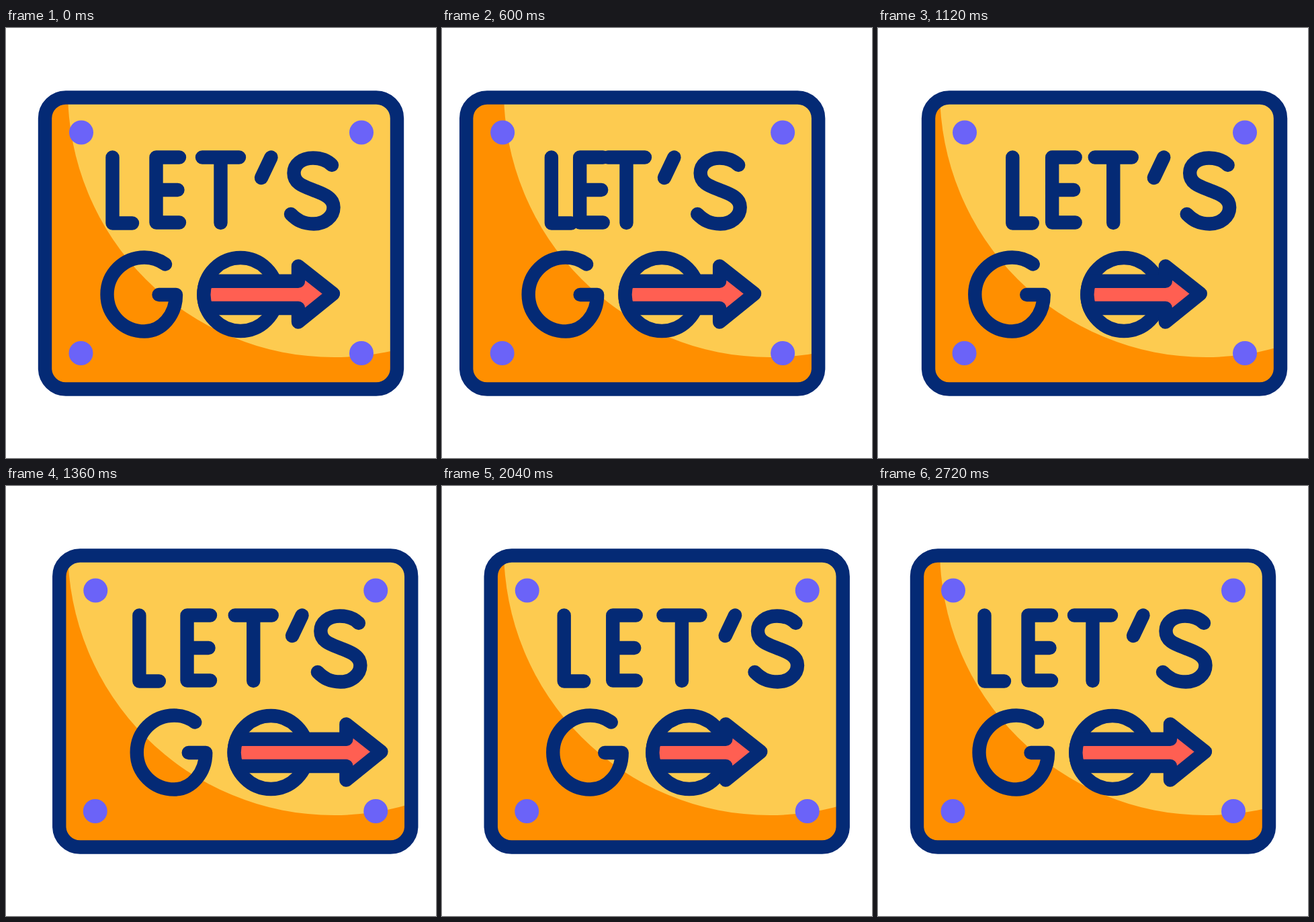
An HTML page for the animation above (3.24 s loop, 640x640 px).

```html
<!DOCTYPE html>
<html lang="en">
<head>
<meta charset="utf-8">
<title>Let's go</title>
<style>
  html, body { margin: 0; height: 100%; overflow: hidden; background: #fff; }
  svg { display: block; width: 100vw; height: 100vh; }
  .line { fill: none; stroke: #042a75; stroke-width: 20.4; stroke-linecap: round; stroke-linejoin: round; }
</style>
</head>
<body>
<svg viewBox="0 0 640 640">
  <clipPath id="window"><rect id="pane" x="58" y="103.5" width="524" height="434" rx="31"/></clipPath>
  <g clip-path="url(#window)">
    <rect width="640" height="640" fill="#ff8f00"/>
    <circle cx="488" cy="94" r="396" fill="#fdcb50"/>
  </g>
  <g id="panel">
    <rect class="line" x="58" y="103.5" width="524" height="434" rx="31"/>
    <g fill="#6b63f8">
      <circle cx="112" cy="155.5" r="18"/><circle cx="529" cy="155.5" r="18"/>
      <circle cx="111.5" cy="484" r="18"/><circle cx="529" cy="484" r="18"/>
    </g>
    <g class="line">
      <path class="letter" d="M158.5 192.5V290.5H188"/>
      <path class="letter" d="M258 192.5H223.5V289.5H258M223.5 241H255.5"/>
      <path class="letter" d="M292 192.5H347M319.5 192.5V290"/>
      <path class="letter" d="M394.5 192.5L380 223"/>
      <path class="letter" d="M485 204C478 197 468 193.5 457 193.5C440 193.5 428.5 203 428.5 216C428.5 232 444 236 458 241.5S487.5 252 487.5 267C487.5 281 474 291.5 458 291.5S433 286 424 277"/>
      <path id="g" d="M237 351.5C228 345 217 341.5 206 341.5C175 341.5 150.5 366 150.5 396.500S175 451.5 206 451.5C232 451.5 253 427 253 397H227.500"/>
      <circle id="o" cx="349" cy="396.5" r="54.5"/>
      <path id="arrow" fill="#ff5f52"/>
    </g>
  </g>
</svg>
<script>
const LOOP = 3240, STEP = 40, STAGGER = 80;
const $ = id => document.getElementById(id);
const letters = document.querySelectorAll('.letter');
const clamp = (v, lo, hi) => Math.min(hi, Math.max(lo, v));

// Smooth travel by a distance between two times; travels add up.
function move(t, start, end, by) {
  const u = clamp((t - start) / (end - start), 0, 1);
  return by * u * u * (3 - 2 * u);
}

// Wind up to the left, swing past rest, then return.
const swing = (t, start, back, out, home, end, windup, reach) =>
  move(t, start, back, -windup) + move(t, back, out, windup + reach) + move(t, home, end, -reach);

const panelX = t => swing(t, 0, 480, 880, 1640, 2560, 36, 29.5)
  + move(t, 880, 1100, -12.5) + move(t, 1100, 1640, 9) + move(t, 1640, 2560, 1.5) + move(t, 2560, 2720, 2);

// Letters also sway twice while they are out.
function letterX(t) {
  const sway = Math.sin(Math.PI * (clamp(t, 640, 1760) - 640) / 560) ** 2;
  return swing(t, 0, 400, 620, 1760, 2240, 28, 27.5) - 14.5 * sway + move(t, 1760, 2240, -3) + move(t, 2240, 2400, 3);
}

const gX = t => swing(t, 700, 1080, 1360, 1360, 1680, 26, 23);
const ringX = t => move(t, 1120, 1600, 48) - move(t, 1600, 2140, 48);
const headX = t => swing(t, 960, 1160, 1540, 1540, 2060, 27, 116) + move(t, 1540, 2060, -28) + move(t, 2060, 2440, 28);

const shift = (el, x) => el.setAttribute('transform', `translate(${x})`);

function draw(now) {
  const t = Math.floor((now % LOOP) / STEP) * STEP;
  const x = panelX(t), ring = ringX(t);
  shift($('panel'), x);
  $('pane').setAttribute('x', 58 + x);
  letters.forEach((el, i) => shift(el, letterX(t - i * STAGGER)));
  shift($('g'), gX(t));
  shift($('o'), ring);
  const tail = 298.3 + ring, neck = 435 + headX(t);
  $('arrow').setAttribute('d',
    `M${tail} 376.7H${neck}V354.5L${neck + 52} 395.500L${neck} 437.500V417H${tail}A54.500 54.500 0 0 1 ${tail} 376.700Z`);
  requestAnimationFrame(() => draw(performance.now()));
}
draw(0);
</script>
</body>
</html>
```
